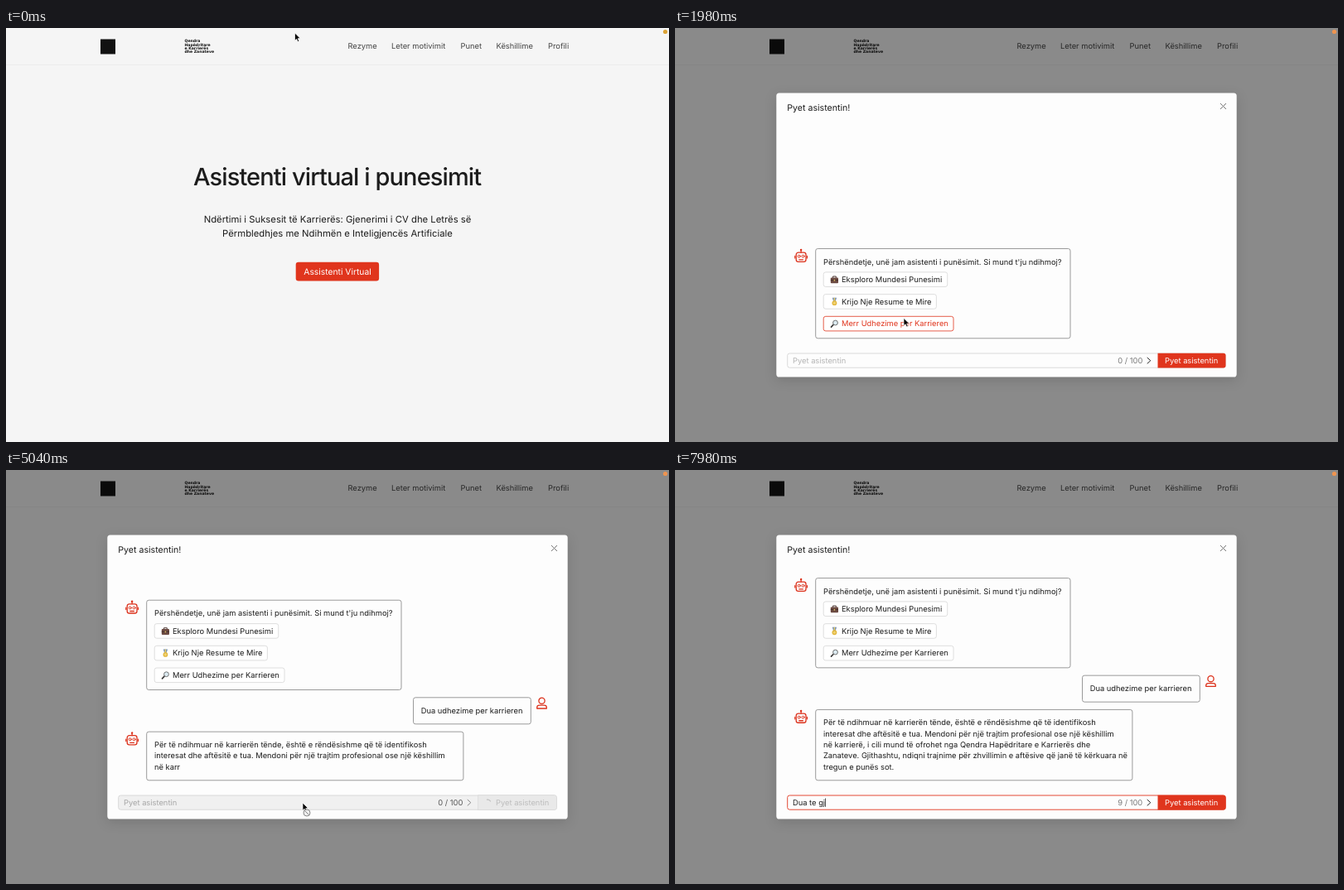
These frames come from a looping animation (800x500 px, 8000 ms). An HTML page:

```html
<!DOCTYPE html>
<html lang="sq">
<head>
<meta charset="utf-8">
<title>Asistenti virtual i punesimit</title>
<style>
  html, body { margin: 0; width: 100%; height: 100%; overflow: hidden; background: #f5f5f5; }
  svg { display: block; width: 100vw; height: 100vh; }
  text { font: 9.33px Inter, sans-serif; fill: #1c1c1c; white-space: pre; text-rendering: geometricPrecision; }
  .nav text { fill: #444; }
  .tagline text { font: bold 4.6px "DejaVu Sans", sans-serif; fill: #111; }
  .heading { font-size: 29px; font-weight: 500; letter-spacing: -.031em; }
  .lead { font-size: 11.3px; }
  .cta { font-size: 10.3px; fill: #fff; }
  .title { font-size: 10.6px; }
  .mid { text-anchor: middle; }
  .bubble { fill: none; stroke: #8f8f8f; stroke-width: .9; }
  .option { fill: #fff; stroke: #d6d6d6; stroke-width: .8; }
  .red { fill: none; stroke: #dc321c; stroke-width: 1.3; stroke-linecap: round; }
  .thin { fill: none; stroke-width: 1; }
</style>
</head>
<body>
<svg viewBox="0 0 800 500">
  <defs>
    <g id="bot" class="red">
      <rect x="146.2" y="4.6" width="11.8" height="11.2" rx="2.6"/>
      <path d="M152.1 4.4V2M144.8 9V11.4M159.4 9V11.4M149.8 13.3H154.4"/>
      <circle cx="152.1" cy="1.5" r=".6"/>
      <circle class="thin" cx="149.7" cy="9.2" r="1.5"/>
      <circle class="thin" cx="154.5" cy="9.2" r="1.5"/>
    </g>
  </defs>

  <rect width="800" height="500" fill="#f5f5f5"/>
  <path d="M0 44.5H800" stroke="#ececec"/>
  <rect x="114" y="13.5" width="18" height="18" fill="#111"/>
  <g class="tagline">
    <text x="215.5" y="17.2">Qendra</text>
    <text x="215.5" y="21.6">Hapëdritare</text>
    <text x="215.5" y="26">e Karrierës</text>
    <text x="215.5" y="30.4">dhe Zanateve</text>
  </g>
  <g class="nav">
    <text x="412.5" y="25.4">Rezyme</text>
    <text x="465" y="25.4">Leter motivimit</text>
    <text x="548.5" y="25.4">Punet</text>
    <text x="591.5" y="25.4">Këshillime</text>
    <text x="654" y="25.4">Profili</text>
  </g>
  <text class="heading mid" x="399.6" y="190">Asistenti virtual i punesimit</text>
  <text class="lead mid" x="400" y="235.2">Ndërtimi i Suksesit të Karrierës: Gjenerimi i CV dhe Letrës së</text>
  <text class="lead mid" x="400" y="252">Përmbledhjes me Ndihmën e Inteligjencës Artificiale</text>
  <rect id="cta" x="349.7" y="282.8" width="100.4" height="22.7" rx="3.2"/>
  <text class="cta mid" x="400" y="297.7">Assistenti Virtual</text>

  <rect id="mask" width="800" height="500"/>

  <g id="modal">
    <rect x="122.3" y="78.5" width="555.4" height="343" rx="3.6" fill="#fdfdfd"
          style="filter: drop-shadow(0 4px 7px rgba(0,0,0,.13))"/>
    <text class="title" x="135.3" y="100.3">Pyet asistentin!</text>
    <path class="thin" stroke="#757575" d="M658 91L665 98M665 91L658 98"/>

    <g id="chat">
      <use href="#bot"/>
      <rect class="bubble" x="169.7" width="307.3" height="108.3" rx="2.6"/>
      <text x="179" y="19">Përshëndetje, unë jam asistenti i punësimit. Si mund t'ju ndihmoj?</text>
      <rect class="option" x="179.2" y="28.4" width="149.5" height="17.6" rx="2.6"/>
      <rect class="option" x="179.2" y="55.1" width="136.2" height="17.6" rx="2.6"/>
      <rect id="guide" class="option" x="179.2" y="81.8" width="156.8" height="17.6" rx="2.6"/>
      <g transform="translate(187.5 32.3)">
        <path class="thin" stroke="#4b3631" d="M3 3V1.2H6.8V3"/>
        <rect x=".3" y="2.6" width="9.2" height="6.8" rx="1" fill="#6b4a42"/>
        <path d="M.3 5.8H9.5" stroke="#3f2b27" stroke-width=".9"/>
        <rect x="4.1" y="5" width="1.6" height="1.9" fill="#d0ad62"/>
      </g>
      <g transform="translate(187.5 59)">
        <path d="M2.3 .3H7.5L6.2 4.6H3.6Z" fill="#6f8bb8"/>
        <path d="M4.1 .3H5.7V4.6H4.1Z" fill="#e8d069"/>
        <circle cx="4.9" cy="6.7" r="2.9" fill="#e2b63c"/>
        <circle cx="4.9" cy="6.7" r="1.6" fill="#f0d374"/>
      </g>
      <g transform="translate(187.5 85.7)">
        <path d="M1 8.9L3.8 6" stroke="#3c3c3c" stroke-width="1.7" stroke-linecap="round"/>
        <circle cx="6" cy="3.8" r="2.9" fill="#dcebf2" stroke="#666" stroke-width=".9"/>
      </g>
      <text x="201" y="40.5">Eksploro Mundesi Punesimi</text>
      <text x="201" y="67.2">Krijo Nje Resume te Mire</text>
      <text id="guideLabel" x="201" y="93.9">Merr Udhezime per Karrieren</text>

      <g id="request" transform="translate(0 117.6)">
        <rect class="bubble" x="491.5" width="141.8" height="32" rx="2.6"/>
        <text x="500.7" y="19">Dua udhezime per karrieren</text>
        <g class="red">
          <circle cx="646.5" cy="4" r="3.6"/>
          <path d="M640.7 13.2V12.2Q640.7 9.4 643.5 9.4H649.5Q652.3 9.4 652.3 12.2V13.2Z" stroke-linejoin="round"/>
        </g>
      </g>
      <g id="answer" transform="translate(0 158.9)">
        <use href="#bot"/>
        <rect id="answerBox" class="bubble" x="169.7" rx="2.6"/>
      </g>
    </g>

    <rect id="field" x="135.7" y="393" width="528.6" height="17.2" rx="2.6" stroke-width=".9"/>
    <text id="fieldText" x="142" y="404.8"></text>
    <path id="caret" stroke="#222" stroke-width=".8" d="M0 396.5V406.8"/>
    <g id="tools">
      <text id="counter" x="534.3" y="404.8"></text>
      <path id="chevron" class="thin" d="M569.8 398L573.8 401.7 569.8 405.4"/>
    </g>
    <path id="send"/>
    <path id="spinner" class="thin" stroke="#b5b5b5" d="M-2.5 -2.5A3.5 3.5 0 0 1 2.5 -2.5"/>
    <text id="sendLabel" x="591" y="404.8">Pyet asistentin</text>
  </g>

  <circle id="indicator" cx="795.5" cy="4.5" r="2.6"/>
  <g id="pointer">
    <path d="M0 0V9.2L2.1 7.3 3.6 10.5 5.2 9.8 3.7 6.7 6.5 6.5Z" stroke="#fff" stroke-width=".7"/>
    <g id="forbidden" class="thin" stroke="#8a8a8a">
      <circle cx="5" cy="12" r="4" fill="#eee"/>
      <path d="M2.2 9.2L7.8 14.8"/>
    </g>
  </g>
  <path id="ibeam" class="thin" stroke="#222" d="M356 397Q358 397 358 398.5 358 397 360 397M358 398V407M356 408Q358 408 358 406.5 358 408 360 408"/>
</svg>

<script>
const LOOP = 8000, STEP = 60;
const OPEN = 900, ASK = 2500, REPLY = 4061.5, READY = 6100, FOCUS = 6650, TYPE = 7350;
const CHARS_PER_MS = 0.1699, KEY_MS = 75;
const RED = '#e0351d', CHAT_BOTTOM = 374.8;
const TYPED = 'Dua te gj';
const ANSWER = [
  'Për të ndihmuar në karrierën tënde, është e rëndësishme që të identifikosh',
  'interesat dhe aftësitë e tua. Mendoni për një trajtim profesional ose një këshillim',
  'në karrierë, i cili mund të ofrohet nga Qendra Hapëdritare e Karrierës dhe',
  'Zanateve. Gjithashtu, ndiqni trajnime për zhvillimin e aftësive që janë të kërkuara në',
  'tregun e punës sot.'
].join('\n');

// time, x, y of the pointer tip
const PATH = [
  [0, 348.5, 6], [180, 349, 8], [700, 391, 309], [840, 388, 302], [1300, 388, 302],
  [2150, 263, 356], [2500, 265, 356], [2940, 315, 356.5], [3600, 321, 358], [4150, 322, 358],
  [4360, 358, 396.5], [4560, 358, 397], [4800, 358, 402], [LOOP, 358, 402]
];

const $ = id => document.getElementById(id);
const clamp = v => Math.max(0, Math.min(1, v));
const show = (id, on) => $(id).setAttribute('visibility', on ? 'inherit' : 'hidden');
function set(id, attributes) {
  for (const name in attributes) $(id).setAttribute(name, attributes[name]);
}

const answerLines = ANSWER.split('\n').map((_, i) => {
  const line = document.createElementNS('http://www.w3.org/2000/svg', 'text');
  line.setAttribute('x', 179);
  line.setAttribute('y', 19 + i * 13.33);
  return $('answer').appendChild(line);
});

function pointerAt(t) {
  const i = PATH.findIndex(key => key[0] > t);
  const [t0, x0, y0] = PATH[i - 1], [t1, x1, y1] = PATH[i];
  const u = (t - t0) / (t1 - t0), k = u * u * (3 - 2 * u);
  return [x0 + (x1 - x0) * k, y0 + (y1 - y0) * k];
}

function drawPointer(t) {
  const [x, y] = pointerAt(t);
  const overCta = t <= OPEN && Math.abs(x - 400) < 50 && y > 283 && y < 305.5;
  const overGuide = t < ASK && t > OPEN && x > 179 && x < 336 && y > 348 && y < 366;
  set('pointer', { transform: `translate(${x} ${y})` });
  show('pointer', t < READY);
  show('forbidden', t > ASK && y > 393 && t < READY);
  show('ibeam', t >= READY && t < TYPE);
  set('cta', { fill: overCta ? '#b9301e' : RED });
  $('guide').style.stroke = overGuide ? RED : '';
  $('guideLabel').style.fill = overGuide ? RED : '';
  set('indicator', { fill: t < 450 ? '#dca336' : '#ee9450' });
}

function drawModal(t) {
  const opened = 1 - (1 - clamp((t - OPEN) / 200)) ** 4;
  const scale = 0.2 + 0.8 * opened;
  set('mask', { opacity: 0.44 * opened });
  set('modal', {
    opacity: opened,
    transform: `translate(390 300) scale(${scale}) translate(-390 -300)`
  });
}

function drawChat(t) {
  const replying = t >= REPLY;
  const count = Math.max(0, Math.floor((t - REPLY) * CHARS_PER_MS));
  const lines = ANSWER.slice(0, count).trimEnd().split('\n');
  answerLines.forEach((line, i) => { line.textContent = lines[i] || ''; });
  const height = 18.7 + 13.33 * lines.length;
  const width = lines.length > 1 ? 382.2 : answerLines[0].getComputedTextLength() + 18.8;
  set('answerBox', { width, height });
  show('request', t >= ASK);
  show('answer', replying);
  const content = replying ? 158.9 + height : t >= ASK ? 149.6 : 108.3;
  set('chat', { transform: `translate(0 ${CHAT_BOTTOM - content})` });
}

function drawField(t) {
  const busy = t >= ASK && t < READY;
  const keys = t < TYPE ? 0 : Math.min(TYPED.length, 1 + Math.floor((t - TYPE) / KEY_MS));
  const left = busy ? 569.5 : 582.5;
  set('field', { fill: busy ? '#f0f0f0' : '#fdfdfd', stroke: t >= READY ? RED : '#d6d6d6' });
  $('fieldText').textContent = keys ? TYPED.slice(0, keys) : 'Pyet asistentin';
  $('fieldText').style.fill = keys ? '#1c1c1c' : busy ? '#a6a6a6' : '#b4b4b4';

  const caretX = 142.4 + (keys ? $('fieldText').getComputedTextLength() : 0);
  set('caret', { transform: `translate(${caretX} 0)` });
  show('caret', t >= FOCUS && (keys || (t - FOCUS) % 1000 < 500));

  set('tools', { transform: `translate(${left - 582.5} 0)` });
  $('counter').textContent = keys + ' / 100';
  $('counter').style.fill = busy ? '#555' : '#777';
  set('chevron', { stroke: busy ? '#888' : '#222' });
  set('send', {
    d: `M${left} 392.7H661.8Q664.5 392.7 664.5 395.4V407.8Q664.5 410.5 661.8 410.5H${left}Z`,
    fill: busy ? '#e9e9e9' : RED,
    stroke: busy ? '#d9d9d9' : 'none',
    'stroke-width': 0.7
  });
  $('sendLabel').style.fill = busy ? '#bcbcbc' : '#fff';
  set('spinner', { transform: `translate(581.3 401.6) rotate(${348 + (t - 2940) * 0.36})` });
  show('spinner', busy);
}

const start = performance.now();
function frame() {
  const elapsed = (performance.now() - start) % LOOP;
  const t = Math.floor(elapsed / STEP) * STEP;
  drawPointer(t);
  drawModal(t);
  drawChat(t);
  drawField(t);
  requestAnimationFrame(frame);
}
frame();
</script>
</body>
</html>
```
